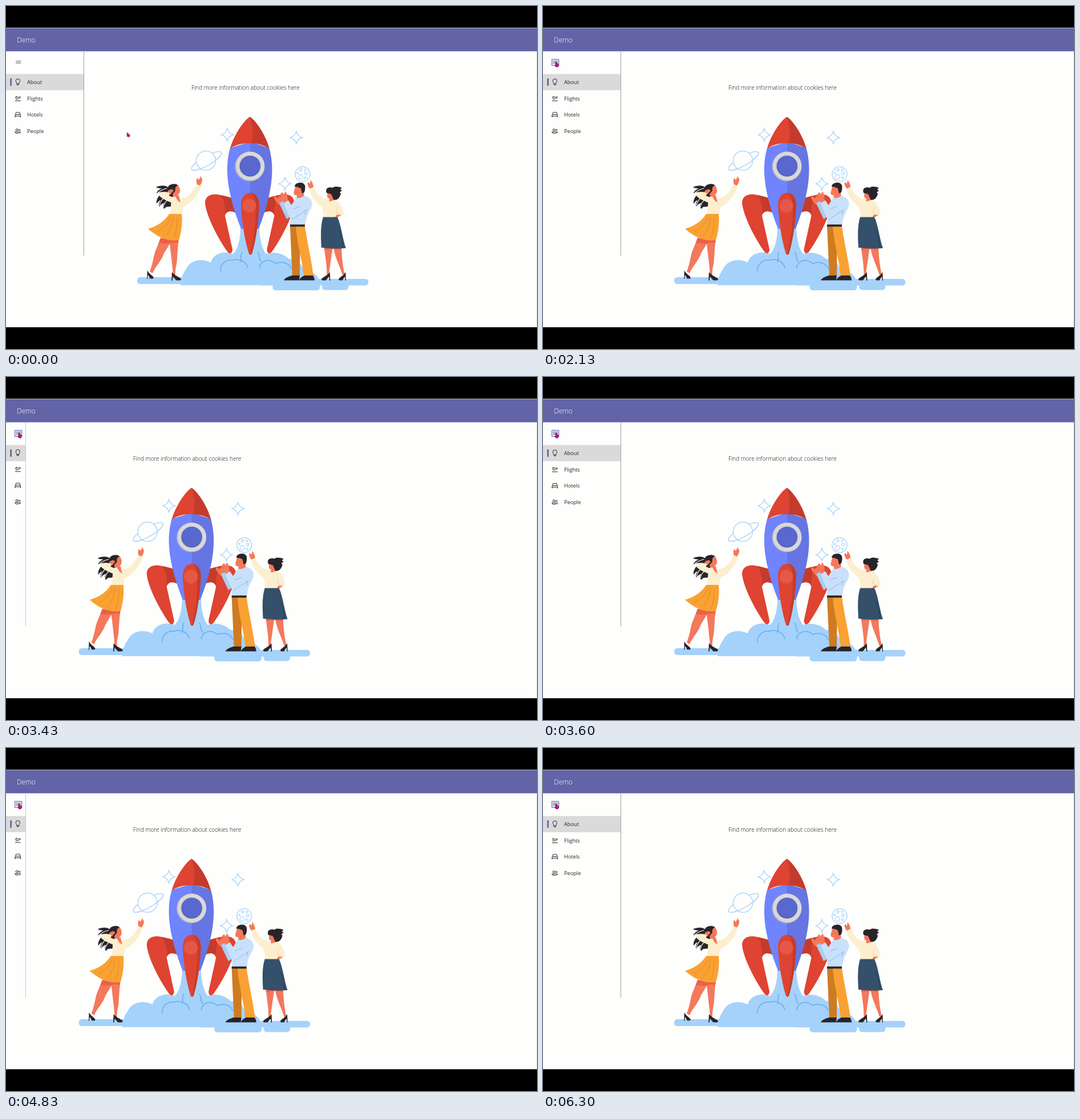
These frames come from a looping animation (931x602 px, 7.06 s). An HTML page with a canvas:

```html
<!DOCTYPE html>
<html lang="en">
<head>
<meta charset="utf-8">
<title>Demo</title>
<style>
html, body { margin: 0; width: 100%; height: 100%; overflow: hidden; background: #000; }
canvas { display: block; width: 931px; height: 602px; }
</style>
</head>
<body>
<canvas id="stage" width="931" height="602"></canvas>
<script>
const c = document.getElementById('stage').getContext('2d');
const LOOP = 7060, SHIFT = 102.3;
const SKY = '#a5d2fb', LINE = '#afd7fb', RED = '#de4431', DARK_RED = '#c43b2c';
const SKIN = '#f4785b', SKIN_DARK = '#e96148', BLACK = '#29242a', CREAM = '#fcefcf';
const ORANGE = '#f9a132', BROWN = '#cf7b22', SHIRT = '#c9e0fb', PURPLE = '#6264a7';
const INK = '#252525';

function rect(x, y, w, h, color) {
  c.fillStyle = color;
  c.fillRect(x, y, w, h);
}
function fill(color, d) {
  c.fillStyle = color;
  c.fill(new Path2D(d));
}
function line(color, width, d) {
  c.strokeStyle = color;
  c.lineWidth = width;
  c.stroke(new Path2D(d));
}
function disc(x, y, r, color) {
  c.beginPath();
  c.arc(x, y, r, 0, 7);
  c.fillStyle = color;
  c.fill();
}
function ring(x, y, r, color, width) {
  c.beginPath();
  c.arc(x, y, r, 0, 7);
  c.strokeStyle = color;
  c.lineWidth = width;
  c.stroke();
}
function pill(x, y, w, h) {
  c.beginPath();
  c.roundRect(x, y, w, h, 5.5);
  c.fillStyle = SKY;
  c.fill();
}
function text(s, x, y, size, color, weight) {
  c.font = `${weight} ${size}px "Open Sans", "Noto Sans", sans-serif`;
  c.fillStyle = color;
  c.fillText(s, x, y);
}
function moved(x, y, draw, sx = 1) {
  c.save();
  c.translate(x, y);
  c.scale(sx, 1);
  draw();
  c.restore();
}

function star(x, y) {
  moved(x, y, () => line(LINE, 1.5,
    'M0-11.5Q1.5-2.5 11-0Q1.5 2.5 0 11.5Q-1.5 2.5-11 0Q-1.5-2.5 0-11.5Z'));
}

function planet() {
  const band = (from, to) => {
    c.beginPath();
    c.ellipse(351.5, 272, 30, 8, -0.52, from, to);
    c.strokeStyle = LINE;
    c.lineWidth = 1.5;
    c.stroke();
  };
  band(0, 7);
  disc(350.5, 271.5, 17, '#fefefd');
  ring(350.5, 271.5, 17, LINE, 1.5);
  band(0, Math.PI);
}

function moon() {
  ring(520, 295, 13, LINE, 1.5);
  for (const [x, y, r] of [[516.5, 300, 4], [526, 294, 2.3], [517, 287.5, 2], [525, 301.5, 1.6], [511.5, 293, 1.3], [524.5, 287.5, 1.3]])
    ring(x, y, r, LINE, 1.3);
}

function ground() {
  pill(230, 476, 130, 12);
  pill(440, 479, 195.5, 11.5);
  pill(467.5, 485, 83, 14);
  pill(554, 486, 46.5, 12.5);
  fill(SKY, 'M306 490C307 477 311 468 315 463C322 446 342 442 359 450C362 436 381 428 398 435C406 428 411 410 411 389H444C445 411 449 427 456 435C474 429 490 437 496 444C509 443 519 453 521 462C536 464 548 473 550 484V490Z');
}

function curls() {
  line('#66adea', 1.5, 'M376 466C375 453 386 444 398 446C410 442 421 449 424 459M414 432C410 437 414 443 411 449M441 432C446 436 442 443 447 448M445 460C444 449 460 441 473 452C484 447 497 452 500 461');
}

function fin() {
  fill(RED, 'M349 346C349 333 360 329 372 331C383 333 391 335 396 337L403 363C394 358 386 360 384 368L397 427C397 435 392 436 388 431C374 411 352 372 349 346Z');
  fill(DARK_RED, 'M376 332L396 337L403 363C394 358 387 360 384.5 366C385 351 382 340 376 332Z');
}

function rocket() {
  fin();
  moved(854.5, 0, fin, -1);
  fill('#7084fe', 'M393 249C382 287 389 332 412 391H429V238Z');
  fill('#6675e2', 'M461.5 249C472 287 466 332 443 391H428V238Z');
  fill(RED, 'M427.5 194.5C418 200 400 225 393 250C410 237.5 444 237.5 461.5 250C455 225 437 200 427.5 194.5Z');
  fill(DARK_RED, 'M427.5 194.5C437 200 455 225 461.5 250Q449 241 431 240.5C434 225 433 207 427.5 194.5Z');
  disc(427.5, 281.5, 26, '#b9bac2');
  disc(428.3, 280.8, 25, '#d9d9db');
  disc(427.7, 281, 19, '#b0b1bd');
  disc(428, 281, 18, '#4b58b4');
  disc(428.6, 280.6, 17.3, '#5868cf');
  fill(RED, 'M428 328C418 328 412 337 412 350C414 386 420 416 426 435Q428.5 438 431 435C437 416 442 386 444 350C444 337 438 328 428 328Z');
  fill(DARK_RED, 'M428 328C438 328 444 337 444 350C442 386 437 416 431 435L428.5 437C434 409 438 389 438 358C438 343 436 332 428 328Z');
  disc(426.5, 350.5, 12, '#e35846');
}

// High-heeled shoe, toe to the right, ankle at the origin.
function heel() {
  fill(BLACK, 'M-2-3C1 2 5 4 10 8Q12 11 9 11.5H4L-.5 5L-1.5 12H-2.6Z');
}

function dancer() {
  fill(SKIN, 'M271 407L290 410C286 421 281 427 277 434C273 447 262 457 257 469L252 466C259 449 258 437 264 425Z');
  fill(SKIN_DARK, 'M271 407L290 410L287 417Q277 417 268 416Z');
  fill(SKIN, 'M286 409H303C301 422 301 432 300 442C300 454 296 461 297 472H293C292 457 289 434 286 409Z');
  fill(SKIN_DARK, 'M286 409H303L302 416Q293 413 287 417Z');
  moved(249.5, 467, heel, 0.85);
  moved(293.5, 470, heel, 1.25);
  fill(BLACK, 'M301 314C294 310 285 314 284 318C278 314 270 315 263 318C267 320 270 320 273 320C267 323 264 326 264 329C269 326 273 326 277 327C268 331 263 339 264 347C267 343 269 341 271 341C268 346 267 350 269 352C272 347 275 347 278 345C275 349 274 354 278 356C281 350 285 354 291 351L294 327Z');
  line('#fefefd', 1.2, 'M284 334C274 336 271 343 269 350M287 338Q277 344 276 353M282 320Q273 322 266 328');
  fill(SKIN, 'M295 317L302 315C306 321 306 327 303 330L301 332L304 341L296 344L292 331Z');
  fill(BLACK, 'M302 315C297 316 296 320 297 324L292 330L286 323Q291 312 302 315Z');
  fill(SKIN, 'M284 324Q291 319 294 324L288 331L282 330Z');
  fill(CREAM, 'M287 328C279 325 270 326 268 330C268 336 282 342 290 345L296 337L286 333Z');
  fill(CREAM, 'M292 335L299 334L303 344L306 337C318 338 327 328 335 312L342 316C337 331 327 345 311 353L308 368H286C291 357 287 348 292 335Z');
  fill(SKIN, 'M297 334L303 332L306 345Q300 342 297 334Z');
  fill(SKIN, 'M335 313C333 308 334 304 335 302L338 305L342 298L342.5 303L344 302Q345 309 340 315Z');
  fill(ORANGE, 'M286 365H308C310 380 307 399 303 411Q276 415 249 391Q274 384 286 365Z');
  line('#dd8b29', 1, 'M289 372Q281 389 265 396M294 371Q291 390 281 403M300 373Q300 393 295 407');
}

function man() {
  fill(BROWN, 'M498 386H516L515 474H502Z');
  fill(ORANGE, 'M508 386H524C528 415 536 448 539 474H522C519 443 511 422 508 386Z');
  fill(BLACK, 'M501 473H515L514 481.5H487Q488 477 501 473Z');
  fill(BLACK, 'M523 473H538Q541 476 541 481.5H514Q515 477 523 473Z');
  fill(SKIN, 'M508 315H521L523 337L509 340L510 332C504 333 504 328 505 325Z');
  fill(BLACK, 'M506 317C507 310 516 309 521 311Q527 315 523 327L519 329L517 320Q512 317 506 317Z');
  fill(SHIRT, 'M509 336Q515 339 523 333C535 336 539 345 535 354C530 364 525 373 525 384H498C500 373 497 363 500 350Z');
  fill(SKIN, 'M470 337C471 332 474 333 476 338L480 333Q486 338 485 344L480 349Q474 346 470 337Z');
  fill('#a9cef5', 'M479 346L486 342L494 357L503 353L504 367L492 374Z');
  fill(SKIN, 'M481 331C483 326 486 326 487 331L490 325Q494 331 494 342L490 348Q484 343 481 331Z');
  fill(SHIRT, 'M487 346L495 341L504 355L527 346Q534 350 527 359L501 375Q497 373 487 346Z');
  line('#8cb6e5', 1, 'M504 356L515 352M501 375L528 357M526 359L524 366');
  rect(498, 383.5, 26, 3.7, BLACK);
}

function friend() {
  fill(SKIN, 'M558 422H573C571 436 569 450 566 472H562.5C563 454 559 439 558 422Z');
  fill(SKIN, 'M574 422H588C589 440 590 455 594 471L590 472C584 453 576 440 574 422Z');
  fill(SKIN_DARK, 'M558 422H588L588 428Q573 425 558 428Z');
  moved(565.5, 470, heel, -1.15);
  moved(593.5, 470, heel, -0.95);
  fill(SKIN, 'M564 324L578 325L576 343H566L567 338C562 337 563 333 564 324Z');
  fill(BLACK, 'M562 328C559 319 567 317 573 319C576 316 583 317 589 319L586 322L589 324L585 327L587 329C586 336 581 341 575 341L570 330Z');
  fill(SKIN, 'M532 320C528 314 528 310 530 309L533 312L534 305L537 310Q540 316 539 321Z');
  fill(CREAM, 'M532 321L540 317C544 329 551 337 563 339L568 343L577 340C585 342 592 359 592 365L581 371H556C558 364 555 357 553 352C542 344 535 334 532 321Z');
  line('#e6d4ac', 1, 'M580 354L578 362L587 366');
  fill(SKIN, 'M580 366L588 367L581 371H577Z');
  fill('#34506a', 'M556 370.5H581C588 385 590 409 596 425Q574 427 553 424C552 405 551 386 556 370.5Z');
  line('#223a51', 0.9, 'M584 394Q590 411 591 425');
}

function scene() {
  text('Find more information about cookies here', 325, 147, 10.05, '#111', 300);
  [[388, 226], [509, 231], [489, 312]].forEach(p => star(...p));
  planet();
  moon();
  ground();
  rocket();
  curls();
  dancer();
  man();
  friend();
}

const icons = [
  () => line(INK, 1, 'M-1.7 2.8C-1.7 1-3.6 0-3.6-2A3.6 3.6 0 0 1 3.6-2C3.6 0 1.7 1 1.7 2.8ZM-1.7 2.8V4.2Q-1.7 5-1 5H1Q1.7 5 1.7 4.2V2.8'),
  () => line(INK, 1, 'M-4.5 4.3H4.5M-4.5-1.5L-2.2 1.8L4.5-1.2Q5-3 3-2.8L.5-1.7L-2.6-3.6L-3.6-3.2L-1.8-.6'),
  () => line(INK, 1, 'M-4.8 4.5V1Q-4.8-.3-3.5-.3H3.5Q4.8-.3 4.8 1V4.5M-4.8 2.5H4.8M-3.7-.3V-3Q-3.7-4-2.5-4H2.5Q3.7-4 3.7-3V-.3'),
  () => {
    ring(-1.7, -1.8, 1.9, INK, 1);
    ring(2.7, -1.5, 1.4, INK, 0.9);
    line(INK, 1, 'M-4.8 1.8H1.4V2.6Q1.2 4.4-1.7 4.4Q-4.8 4.4-4.8 1.8ZM2.8 1.8H4.8Q4.7 4 2.5 4');
  }
];

function sidebar(open, focused) {
  const width = open ? 136 : 34;
  rect(0, 119.4, width, 28.4, '#dadada');
  rect(7.3, 127, 2.7, 13, PURPLE);
  rect(width, 80, 1, 358, open ? '#a0a0a0' : '#c8c8c8');
  ['About', 'Flights', 'Hotels', 'People'].forEach((name, i) => {
    const y = 133.5 + i * 28.6;
    moved(20.8, y - (open ? 0 : 0.5), icons[i]);
    if (open) text(name, 37, y + 3.7, 9.2, '#242424', 400);
  });
  if (focused) {
    rect(15.8, 93.5, 12, 11, '#e4e6f2');
    line('#5a6fbd', 1, 'M15.8 93.5H27.8V104.5H15.8Z');
  }
  line('#777', 0.9, 'M17.5 96.3H26M17.5 98.5H26M17.5 100.7H26');
}

function pointer(d) {
  fill('#e5007d', d);
  line('#38143c', 0.7, d);
}

function cursor(t) {
  if (t >= 1200) {
    pointer('M22 99Q22 98 23 98Q24 98 24 99V101L27 102Q28 103 27 105L26 107H23L20.5 104L22 103.5Z');
    return;
  }
  const step = t < 460 ? 0 : Math.min(22, Math.floor((t - 460) / 33.33) + 1);
  const k = 1 - Math.pow(1 - step / 22, 2.4);
  moved(212 - 191 * k, 222 - 123 * Math.min(1, k * 1.03),
    () => pointer('M.3.3V7.4L2 6L3.3 8.3L4.5 7.6L3.4 5.4L5.4 5.2Z'));
}

function frame(now) {
  const t = now % LOOP;
  const open = t < 2230 || (t >= 3600 && t < 4830) || t >= 6300;
  rect(0, 0, 931, 602, '#000');
  rect(0, 38, 931, 1, '#bdbcaf');
  rect(0, 80, 931, 483, '#fefefd');
  rect(0, 79, 931, 1, '#fefefd');
  rect(0, 39, 931, 40.5, PURPLE);
  rect(930, 80, 1, 483, '#e3e6e7');
  rect(0, 563, 931, 1, '#b9c9bc');
  text('Demo', 19.3, 64, 11.9, '#fff', 300);
  c.lineJoin = c.lineCap = 'round';
  moved(open ? 0 : -SHIFT, 0, scene);
  sidebar(open, t >= 2130);
  cursor(t);
  requestAnimationFrame(frame);
}
requestAnimationFrame(frame);
</script>
</body>
</html>
```
